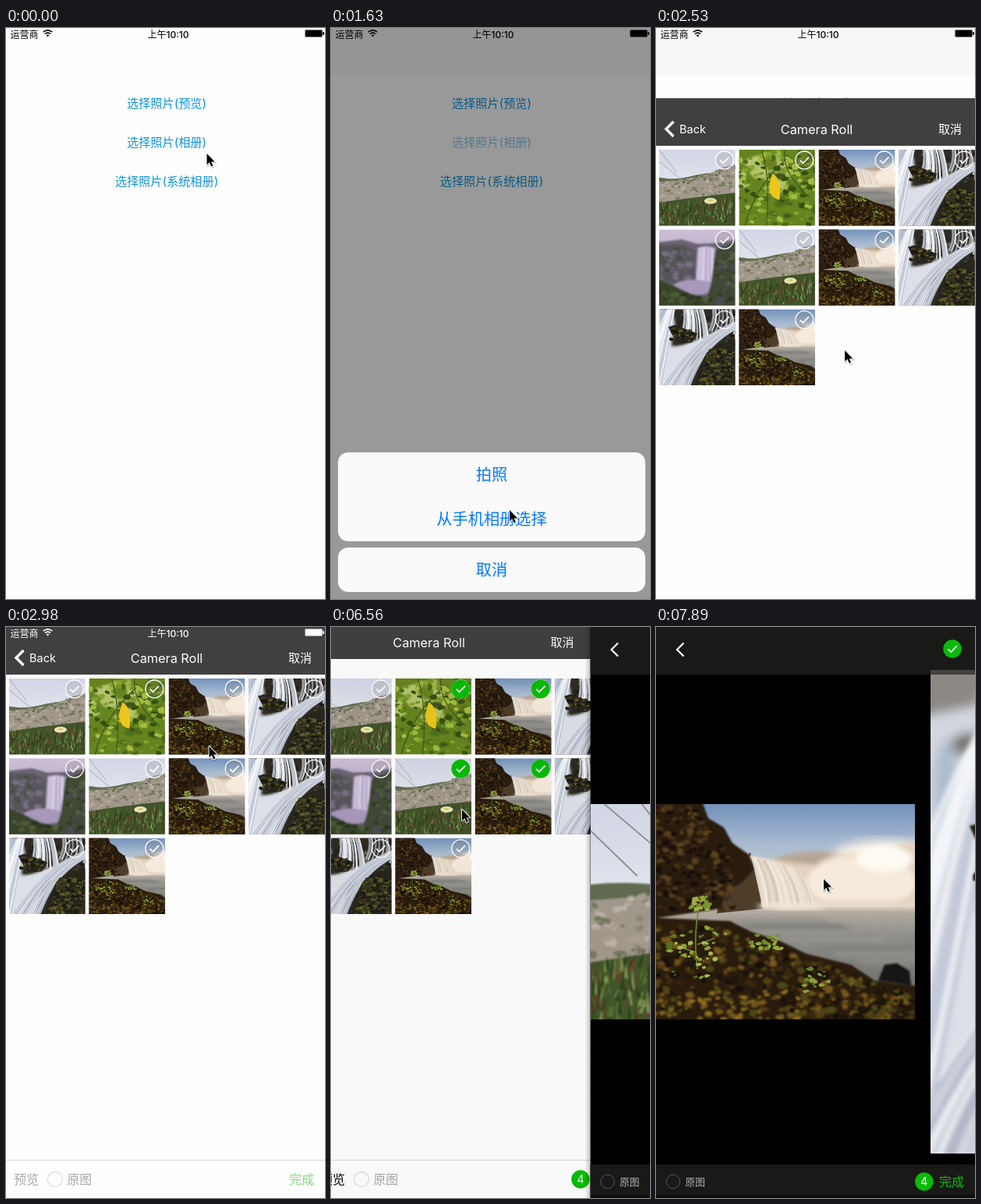
Write an HTML page that moves like this. It is 409 px wide and 732 px high and loops after 8000 ms.

```html
<!DOCTYPE html>
<html lang="zh">
<head>
<meta charset="utf-8">
<title>Photo picker</title>
<style>
html, body { margin: 0; width: 100%; height: 100%; overflow: hidden; background: #fefefe; }
svg { display: block; }
#stage { width: 100vw; height: 100vh; }
text { font-family: Inter, "Noto Sans CJK SC", "Noto Sans CJK", sans-serif; white-space: pre; }
</style>
</head>
<body>
<svg id="stage" viewBox="0 0 409 732" preserveAspectRatio="none"></svg>
<script>
const GREEN = '#09bb07', W = 409, H = 732, STEP = 149, LOOP = 8000;

let seed = 77;
const rnd = (a, b) => {
  seed = seed * 16807 % 2147483647;
  return a + (b - a) * seed / 2147483647;
};

// SVG string helpers
const path = (d, fill, extra = '') => `<path d="${d}" fill="${fill}" ${extra}/>`;
const line = (d, color, width, extra = '') =>
  path(d, 'none', `stroke="${color}" stroke-width="${width}" ${extra}`);
const rect = (x, y, w, h, fill, extra = '') =>
  `<rect x="${x}" y="${y}" width="${w}" height="${h}" fill="${fill}" ${extra}/>`;
const disc = (x, y, r, fill, extra = '') =>
  `<circle cx="${x}" cy="${y}" r="${r}" fill="${fill}" ${extra}/>`;
const oval = (x, y, rx, ry, fill, extra = '') =>
  `<ellipse cx="${x}" cy="${y}" rx="${rx}" ry="${ry}" fill="${fill}" ${extra}/>`;
const group = (id, body, extra = '') => `<g id="${id}" ${extra}>${body}</g>`;
const blur = (size, body) => `<g filter="url(#blur${size})">${body}</g>`;
// y is the middle of the glyphs
const text = (x, y, size, str, fill, extra = '') =>
  `<text x="${x}" y="${y + size * 0.375}" font-size="${size}" fill="${fill}" ${extra}>${str}</text>`;
const mid = 'text-anchor="middle"';
const fade = (id, ...stops) =>
  `<linearGradient id="${id}" x1="0" y1="0" x2="0" y2="1">` +
  stops.map(([o, c]) => `<stop offset="${o}" stop-color="${c}"/>`).join('') + '</linearGradient>';
const fix = v => v.toFixed(1);

// Rough clumps, one path per colour
function clumps(n, colors, size, place) {
  return colors.map(color => {
    let d = '';
    for (let i = 0; i < n; i++) {
      const [x, y] = place(), r = rnd(size * 0.4, size);
      for (let j = 0; j < 6; j++) {
        const a = j * Math.PI / 3, q = r * rnd(0.5, 1.3);
        d += (j ? 'L' : 'M') + fix(x + Math.cos(a) * q) + ' ' + fix(y + Math.sin(a) * q * 0.7);
      }
      d += 'Z';
    }
    return path(d, color);
  }).join('');
}

function blades(n, colors) {
  return colors.map(color => {
    let d = '';
    for (let i = 0; i < n; i++) {
      const x = rnd(0, W), y = rnd(212, 290) - x * 0.08, h = rnd(16, 34), lean = rnd(-6, 9);
      d += `M${fix(x - 2)} ${fix(y)}l${fix(lean + 2)} ${fix(-h)}L${fix(x + 3)} ${fix(y)}Z`;
    }
    return path(d, color);
  }).join('');
}

// Flowing strands; shape(u) gives a curve for u in 0..1
const strands = (n, colors, width, shape) => colors.map(color => {
  let d = '';
  for (let i = 0; i < n; i++) d += shape(rnd(0, 1));
  return line(d, color, width);
}).join('');

const blurs = [1, 3, 7].map(s => `<filter id="blur${s}"><feGaussianBlur stdDeviation="${s}"/></filter>`).join('');
const gradients = blurs +
  fade('duneSky', [0, '#d2d5e4'], [1, '#f6f6f8']) +
  fade('lakeSky', [0, '#7391bb'], [0.35, '#a9bbd0'], [1, '#f3e6d8']) +
  fade('lake', [0, '#b9b0a4'], [0.25, '#908f8a'], [1, '#5b5d5a']) +
  fade('dusk', [0, '#cdbfd6'], [1, '#a192b8']) +
  '<linearGradient id="edge"><stop stop-color="#000" stop-opacity="0"/><stop offset="1" stop-color="#000" stop-opacity=".22"/></linearGradient>';

const dunes = () => {
  const slope = () => { const x = rnd(0, W); return [x, rnd(128 - x * 0.14, 195 - x * 0.08)]; };
  return rect(0, 0, W, 276, 'url(#duneSky)') +
    blur(1,
      path('M-9 104Q45 98 90 104T200 92L418 60V150H-9Z', '#5f6b50') +
      path('M-9 124Q120 116 200 100Q260 86 300 64L418 44V290H-9Z', '#a0978a') +
      clumps(55, ['#8a8670', '#b8b0a4', '#74775c', '#a89c90'], 9, slope) +
      clumps(26, ['#5a6644', '#78806a'], 7, () => { const x = rnd(150, W); return [x, rnd(112, 130) - (x - 150) * 0.3]; }) +
      path('M-9 204Q60 194 120 184T418 148V290H-9Z', '#42542a') +
      blades(80, ['#2b3a1b', '#546f32', '#6b3a2a', '#7d9150', '#3b5526', '#2f3f1c'])) +
    line('M18 0L150 112M66 0L130 82M0 34L60 92', '#8c8c94', 1.8) +
    oval(253, 186, 23, 11, '#e6e4b6') + oval(253, 184, 9, 4, '#d6c968');
};

const leaves = () =>
  rect(0, 0, 100, 100, '#65841f') +
  blur(1,
    clumps(12, ['#9db64a', '#b5c46c'], 12, () => [rnd(0, 60), rnd(0, 50)]) +
    clumps(14, ['#3c5515', '#4e6c1a'], 10, () => [rnd(40, 110), rnd(20, 100)])) +
  clumps(26, ['#4a691b', '#86a52e', '#34500f', '#6f9124', '#a3bb42'], 6, () => [rnd(0, 100), rnd(0, 100)]) +
  line('M30 0Q42 40 36 100M60 0Q56 30 92 62M8 100Q20 50 62 12', '#40521a', 1.2) +
  path('M44 31Q58 40 53 66Q38 63 40 44Z', '#ecc61c');

const lakeFall = () => {
  const shore = () => { const x = rnd(0, W); return [x, rnd(156 + Math.max(0, x - 150) * 0.35, 276)]; };
  const cliff = () => { const y = rnd(4, 135); return [rnd(0, 124 + Math.min(y, 75) * 0.7), y]; };
  return rect(0, 0, W, 150, 'url(#lakeSky)') +
    blur(7, oval(370, 72, 70, 26, '#fbf3ea')) +
    blur(3,
      path('M205 80Q245 60 290 61Q325 66 350 60L420 46V140H205Z', '#e3d2be') +
      path('M225 72Q255 58 310 62L280 78Z', '#b5a592') +
      oval(340, 100, 70, 34, '#f6eadc') + oval(370, 70, 36, 16, '#fffaf2')) +
    rect(0, 132, W, 144, 'url(#lake)') +
    blur(3, rect(230, 124, 190, 10, '#e6d8c8') +
      strands(14, ['#a5a29a', '#787a77'], 2, u => `M${fix(150 + u * 200)} ${fix(145 + u * 60)}h130`)) +
    path('M155 140L165 90L198 62L214 134Z', '#4d3d29') +
    blur(1,
      path('M196 66Q240 72 258 84Q276 104 284 132H212Q214 92 196 66Z', '#e6dacb') +
      strands(9, ['#fbf4ea', '#c6b7a5', '#f1e6d8'], 2, u => `M${fix(198 + u * 58)} ${fix(67 + u * 16)}q${fix(14 + u * 6)} 26 ${fix(16 + u * 6)} ${fix(64 - u * 16)}`)) +
    blur(3, oval(250, 131, 44, 5, '#efe4d6')) +
    blur(1,
      path('M-9 -9H134L144 18L164 30L175 50L195 64L202 84L188 100L166 112L160 134L78 146L-9 156Z', '#2a1d10') +
      clumps(75, ['#4b3518', '#120c07', '#3a2814', '#5c431d', '#1a1109'], 6, cliff) +
      path('M-9 144L80 146L172 150L200 164L237 176L270 192L327 206L357 226L418 234V290H-9Z', '#2a1d0d') +
      clumps(95, ['#573f16', '#120c07', '#3d2b11', '#74561a', '#1d140a', '#4c4416'], 7, shore) +
      clumps(40, ['#6d561b', '#8a6a1f'], 6, () => [rnd(0, 260), rnd(238, 276)]) +
      path('M362 226L370 206L386 204L402 214L404 232Z', '#191713')) +
    line('M130 212Q124 160 134 128M128 190L104 182M130 180L152 172', '#6f8a2a', 1.6) +
    clumps(14, ['#8aa336', '#a9ba50', '#566f24'], 5, () => [rnd(92, 168), rnd(158, 222)]) +
    clumps(9, ['#9db045', '#7a9530'], 6, () => [rnd(120, 146), rnd(117, 136)]) +
    clumps(11, ['#6f8c2c', '#93a83c'], 5, () => [rnd(198, 240), rnd(168, 186)]) +
    clumps(10, ['#66822a', '#8ba238'], 5, () => [rnd(266, 304), rnd(208, 240)]);
};

const rapids = () =>
  rect(0, 0, W, 620, '#2e2b24') +
  blur(1, clumps(40, ['#4a4833', '#191713', '#5e5c44', '#24211b'], 18, () => [rnd(70, W), rnd(0, 310)])) +
  blur(7,
    path('M-20 -20H90Q110 60 70 130Q100 190 70 270L40 640H-20Z', '#d3d7e0') +
    path('M-20 -20H90L60 46L-20 62Z', '#8c8984') +
    oval(50, 96, 24, 16, '#77766f') + oval(20, 150, 16, 60, '#aebccd') + oval(30, 400, 22, 110, '#eceef3') +
    path('M425 185Q300 225 220 300Q150 400 130 640H-20V300Q60 320 150 290Q300 230 425 175Z', '#dcdfe7')) +
  blur(3,
    strands(7, ['#e3e6ec', '#b4b9c4', '#f4f5f8'], 9, u => `M${fix(110 + u * 120)} ${fix(40 + u * 50)}q${fix(46 - u * 20)} 80 ${fix(10 + u * 30)} 200`) +
    strands(5, ['#c9cdd5', '#9a9da6'], 9, u => `M${fix(270 + u * 140)} ${fix(70 + u * 20)}q30 70 -10 150`) +
    strands(12, ['#f6f7fa', '#b3b8c8', '#ccd1dc'], 7, u => `M409 ${fix(175 + u * 40)}Q${fix(240 + u * 30)} ${fix(240 + u * 50)} ${fix(120 + u * 80)} ${fix(380 + u * 60)}T${fix(-60 + u * 210)} 650`) +
    strands(8, ['#c2c9d8', '#f2f4f8'], 6, u => `M${fix(70 + u * 20)} 60Q${fix(u * 60)} ${fix(160 + u * 120)} -10 ${fix(200 + u * 420)}`)) +
  blur(1,
    path('M50 200L82 190L150 214L206 236L176 284L110 290L66 236Z', '#27251b') +
    clumps(12, ['#6a5c26', '#3c3a22', '#14130e'], 13, () => [rnd(60, 180), rnd(206, 276)]) +
    path('M425 265Q310 285 255 340Q200 430 175 640H425Z', '#28251b') +
    clumps(46, ['#474d25', '#15130e', '#5d5c2a', '#37351f', '#1f1c14'], 17, () => { const y = rnd(320, 610); return [rnd(265 - (y - 320) * 0.25, W), y]; }));

const duskFall = () =>
  rect(0, 0, 100, 100, 'url(#dusk)') +
  blur(1,
    path('M-5 17L30 13L50 19L78 18L105 12V105H-5Z', '#6b6374') +
    path('M-5 20L32 20L48 28L46 76L-5 66Z', '#57565a') +
    clumps(14, ['#454f41', '#67606f', '#7a6f86'], 6, () => [rnd(0, 44), rnd(24, 64)]) +
    path('M51 24Q64 20 74 25L70 76H48Z', '#cbbfda') +
    strands(6, ['#e4dcef', '#b1a3c6'], 1.4, u => `M${fix(53 + u * 19)} 24l${fix(-3 * (1 - u))} 52`) +
    oval(46, 76, 28, 10, '#a898bc') +
    path('M74 26L105 16V105H58L68 72Z', '#414a36') +
    clumps(14, ['#2c3524', '#566044', '#4d4a52'], 6, () => [rnd(78, 100), rnd(28, 98)]) +
    path('M-5 64L20 74L40 84L66 90V105H-5Z', '#37442a') +
    clumps(12, ['#27301a', '#4f5c38'], 5, () => { const x = rnd(0, 66); return [x, rnd(72 + x * 0.3, 100)]; }));

const photos = {
  dunes: [dunes, W, 276], leaves: [leaves, 100, 100], lake: [lakeFall, W, 276],
  rapids: [rapids, W, 620], dusk: [duskFall, 100, 100]
};
const shot = (name, x, y, w, h) => {
  const [, pw, ph] = photos[name];
  return `<svg x="${x}" y="${y}" width="${w}" height="${h}" viewBox="0 0 ${pw} ${ph}" preserveAspectRatio="xMidYMid slice"><use href="#p-${name}"/></svg>`;
};
const defs = '<defs>' + gradients +
  Object.keys(photos).map(n => group('p-' + n, photos[n][0]())).join('') + '</defs>';

const tick = () => line('M-5.5 0.3L-1.8 4L5.8 -3.8', '#fff', 1.7);

// Home page and action sheet
const card = (y, h) => rect(9, y, 394, h, '#fafafa', 'rx="13"');
const home =
  rect(0, 0, W, H, '#fefefe') + rect(0, 0, W, 61, '#f7f7f7', 'id="homeBar"') +
  ['选择照片(预览)', '选择照片(相册)', '选择照片(系统相册)'].map((s, i) =>
    text(206, 96 + i * 50, 15.2, s, '#1195db', `${mid} id="link${i}"`)).join('') +
  rect(0, 0, W, H, '#000', 'id="dim"') +
  group('sheet', card(544, 114) + card(666, 57) +
    text(206, 572.5, 20.2, '拍照', '#007aff', mid) +
    text(206, 629.5, 20.2, '从手机相册选择', '#007aff', mid) +
    text(206, 694.5, 20.2, '取消', '#007aff', mid + ' font-weight="500"'));

// Picker grid
const names = ['dunes', 'leaves', 'lake', 'rapids', 'dusk', 'dunes', 'lake', 'rapids', 'rapids', 'lake'];
const cells = names.map((n, i) => ({ n, x: 4 + i % 4 * 102.4, y: 66 + Math.floor(i / 4) * 102.3 }));
const grid = cells.map(({ n, x, y }, i) =>
  shot(n, x, y, 97.5, 97.5) +
  `<g transform="translate(${x + 83.8} ${y + 13.4})"><g id="mark${i}">` +
  disc(0, 0, 11.4, 'rgba(90,90,90,.15)', 'stroke="#fff" stroke-width="1.3"') +
  disc(0, 0, 12, GREEN, 'class="on"') + tick() + '</g></g>').join('');
const badge = (id, y) =>
  `<g transform="translate(343.8 ${y})"><g id="${id}">${disc(0, 0, 11.7, GREEN)}${text(0, 0, 14.5, '4', '#fff', mid)}</g></g>`;
const picker =
  group('page',
    rect(0, 0, W, H, '#fefefe') + grid + rect(0, 683, W, 1, '#d4d4d4') +
    text(10, 708, 16, '预览', '#a8a8a8', 'id="look"') +
    disc(63, 708, 9.6, '#fdfdfd', 'stroke="#dcdcdc" stroke-width="1.2"') +
    text(78.5, 708, 15.8, '原图', '#a6a6a6') + badge('count', 708) +
    text(363, 708, 16, '完成', GREEN, 'id="done"')) +
  group('bar', '<rect id="barBack" width="440" height="61" fill="#404040"/>' +
    group('barText', line('M22.5 30L13 39.5L22.5 49', '#fff', 3.4) +
      text(30, 39.5, 14.5, 'Back', '#fff') +
      text(206, 39.5, 16.3, 'Camera Roll', '#fff', mid) +
      text(362, 39.5, 15, '取消', '#fff')));

// Full-size viewer
const viewer =
  rect(-7, 0, 7, H, 'url(#edge)') + rect(0, 0, W, H, '#000') +
  `<svg width="${W}" height="${H}">` + group('pages',
    shot('dunes', 0, 227, W, 276) + shot('lake', 429, 227, W, 276) + shot('rapids', 858, 55, W, 620)) + '</svg>' +
  rect(0, 0, W, 61, 'rgba(36,36,33,.7)') + rect(0, 689, W, 39, '#191917') + rect(0, 728, W, 4, '#0d0b0b') +
  line('M35.5 20.5L27 29L35.5 37.5', '#fff', 2.2) +
  `<g transform="translate(380 28)">${disc(0, 0, 11.7, GREEN)}${tick()}</g>` +
  disc(22, 711, 8.8, 'none', 'stroke="#555" stroke-width="1"') +
  text(37.5, 711, 12.8, '原图', '#b0b0b0') + badge('count2', 711) +
  text(363, 711, 16, '完成', GREEN);

const status =
  text(5.5, 8, 12, '运营商', 'currentColor') +
  text(208, 8, 12, '上午10:10', 'currentColor', mid + ' font-weight="500"') +
  line('M47.8 5.2Q53.5 0.4 59.2 5.2M50 7.6Q53.5 4.8 57 7.6', 'currentColor', 1.7) +
  path('M51.6 9.2Q53.5 7.8 55.4 9.2L53.5 11.4Z', 'currentColor') +
  rect(383.5, 2.5, 22, 9, 'currentColor', 'rx="1"') + rect(406, 5, 2, 4, 'currentColor', 'rx="1"');

const arrow = 'M0 0V14.2L3.3 11.2L5.6 16.6L7.9 15.6L5.6 10.4H10.2Z';
const stage = document.getElementById('stage');
stage.innerHTML = defs + group('home', home) + group('picker', picker) +
  rect(0, 0, W, H, '#000', 'id="shade"') + group('viewer', viewer) + group('status', status) +
  group('cursor', path(arrow, '#000', 'opacity=".2" transform="translate(.8 1.4)" stroke="#000" stroke-width="2"') +
    path(arrow, '#000', 'stroke="#fff" stroke-width="1.8" stroke-linejoin="round" paint-order="stroke"'));

// Timeline in steps of STEP ms: [step, values...]
const cursorPath = [
  [0, 257.5, 161], [4, 245, 147], [8, 245, 147], [11, 229, 618], [12, 229, 618], [14, 229.5, 598],
  [16, 236, 500], [20, 260.5, 153], [23, 192, 84], [26, 190, 83], [29, 292, 83], [31, 292, 83],
  [32, 320.5, 177], [34, 294, 184], [35, 292, 184], [37, 192, 184], [38, 190, 184], [40, 168, 234],
  [44, 168, 234], [47, 300, 323], [48, 260, 323], [49, 170, 323], [51, 292, 323], [52, 271, 323], [53, 215, 323]];
const sheetIn = [[5, 0], [6, 0.3], [7, 0.777], [8, 0.985], [9, 1], [12, 1], [13, 0.42], [14, 0.0375], [15, 0]];
const modalY = [[14, 732], [15, 690], [16, 330], [17, 90], [18, 20], [19, 1], [20, 0]];
const push = [[43, 0], [44, 0.187], [45, 0.65], [46, 0.93], [47, 1]];
const scroll = [[47, 0], [48, -40], [49, -200], [50, -385], [51, -429], [52, -450], [53, -506]];
const picks = { 1: 26, 2: 31, 6: 35, 5: 38 };
const markScale = [1.12, 1, 0.95], badgeScale = [0.6, 0.86, 1.08];

function at(table, k) {
  const i = table.findIndex(row => row[0] >= k);
  if (i < 0) return table[table.length - 1].slice(1);
  if (i === 0) return table[0].slice(1);
  const a = table[i - 1], b = table[i], f = (k - a[0]) / (b[0] - a[0]);
  return a.slice(1).map((v, j) => v + (b[j + 1] - v) * f);
}

const el = id => document.getElementById(id);
const set = (id, name, value) => el(id).setAttribute(name, value);
const move = (id, x, y) => set(id, 'transform', `translate(${x} ${y})`);
const show = (id, on) => set(id, 'visibility', on ? 'visible' : 'hidden');
const bounce = (scales, age) => `scale(${scales[age] || 1})`;

function draw(k) {
  const [s] = at(sheetIn, k), [y] = at(modalY, k), [p] = at(push, k);
  move('cursor', ...at(cursorPath, k));

  set('homeBar', 'opacity', k > 5 ? 1 : 0);
  set('link1', 'opacity', k > 3 && k < 13 ? 0.5 : 1);
  set('dim', 'opacity', 0.4 * s);
  move('sheet', 0, 188 * (1 - s));

  move('picker', 0, y);
  let total = 0, latest = 0;
  cells.forEach((c, i) => {
    const on = k >= picks[i];
    el('mark' + i).querySelector('.on').setAttribute('opacity', on ? 1 : 0);
    set('mark' + i, 'transform', bounce(markScale, k - picks[i]));
    if (on) { total++; latest = Math.max(latest, picks[i]); }
  });
  set('look', 'fill', total ? '#000' : '#a8a8a8');
  set('done', 'fill', total ? GREEN : '#84dd83');
  set('count', 'opacity', total ? 1 : 0);
  set('count', 'transform', bounce(badgeScale, k - latest));
  el('count').querySelector('text').textContent = total || '';

  const full = k >= 43;
  move('page', -128 * p, 0);
  move('bar', -430 * p, 0);
  set('barBack', 'height', full ? 41 : 61);
  move('barText', 0, full ? -20 : 0);
  set('shade', 'opacity', 0.1 * p);
  show('viewer', p > 0);
  move('viewer', W * (1 - p), 0);
  move('pages', at(scroll, k)[0], 0);

  show('status', !full);
  set('status', 'color', y < 2 ? '#fff' : '#000');
}

let last = -1;
function frame() {
  const k = Math.floor((performance.now() % LOOP + 10) / STEP);
  if (k !== last) draw(last = k);
  requestAnimationFrame(frame);
}
frame();
</script>
</body>
</html>
```
